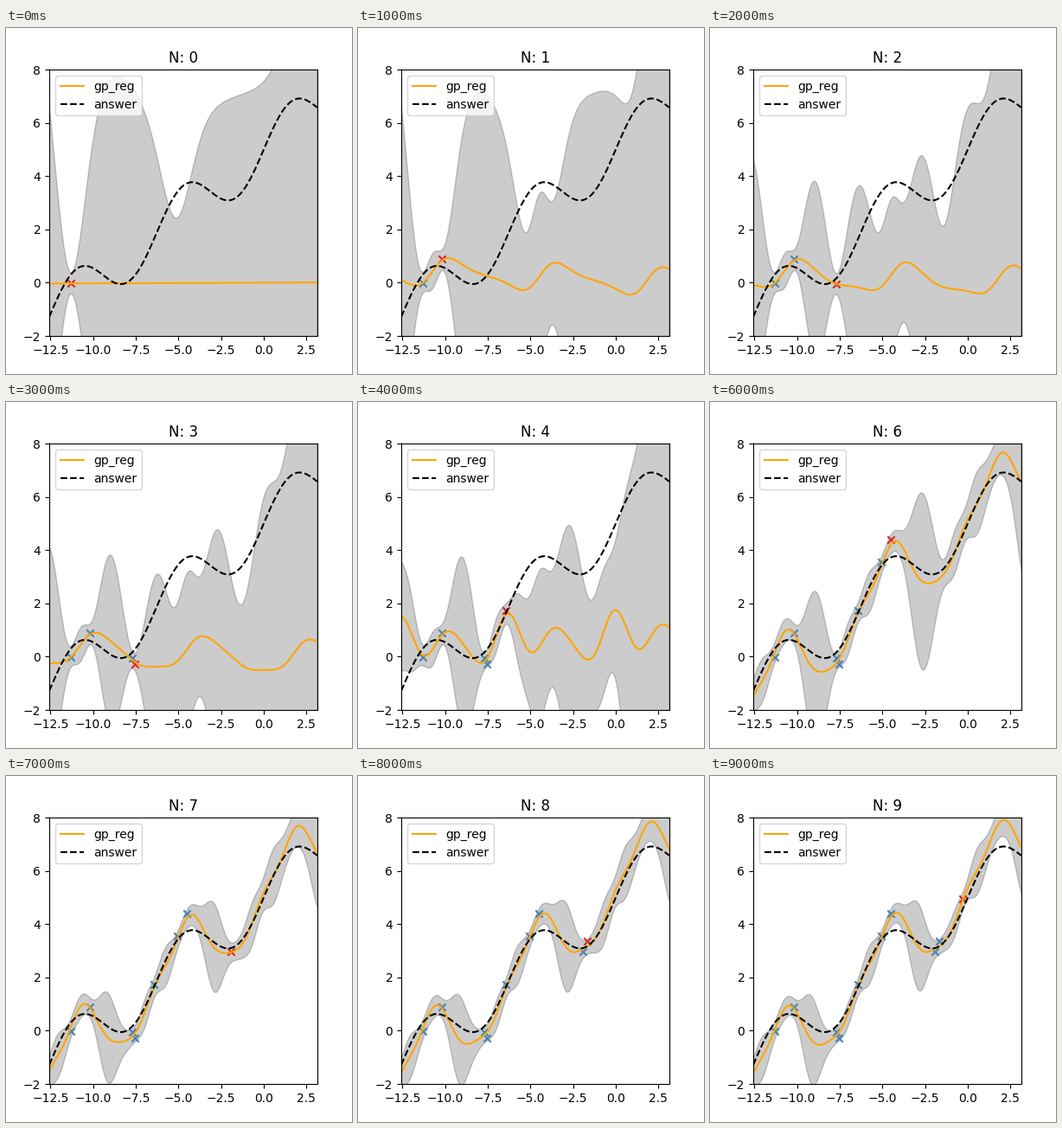
These frames come from a looping animation (400 by 400 pixels, 10 s). A matplotlib script:

```python
import numpy as np
import matplotlib.pyplot as plt
from matplotlib.animation import FuncAnimation

NOISE = 0.1

# observed (x, y), one more per step
POINTS = [(-11.28, -0.03), (-10.17, 0.88), (-7.70, -0.06), (-7.55, -0.28),
          (-6.43, 1.72), (-5.07, 3.54), (-4.51, 4.38), (-1.93, 2.96),
          (-1.67, 3.37), (-0.28, 4.96)]

grid = np.linspace(-4 * np.pi, np.pi, 300)
answer = np.sin(grid) + 0.5 * grid + 5


def kernel(a, b):
    """Linear trend with bias plus a periodic term."""
    a, b = a[:, None], b[None, :]
    return 1 + a * b + np.exp(np.cos(a - b))


def regress(x, y):
    """Posterior mean and variance on the grid."""
    cov = kernel(x, x) + NOISE * np.eye(len(x))
    cross = kernel(grid, x)
    weights = np.linalg.solve(cov, cross.T).T
    prior = 1 + grid ** 2 + np.e + NOISE
    return weights @ y, prior - np.sum(cross * weights, axis=1)


fig, ax = plt.subplots(figsize=(4, 4), dpi=100)
fig.subplots_adjust(left=0.125, right=0.9, bottom=0.11, top=0.88)


def draw(n):
    x, y = np.array(POINTS[:n + 1]).T
    mean, var = regress(x, y)
    ax.clear()
    ax.fill_between(grid, mean - 2 * var, mean + 2 * var,
                    color="black", alpha=0.2)
    ax.scatter(x[:-1], y[:-1], marker="x", color="steelblue")
    ax.scatter(x[-1:], y[-1:], marker="x", color="tab:red")
    ax.plot(grid, mean, color="orange", label="gp_reg")
    ax.plot(grid, answer, color="black", ls="--", label="answer")
    ax.set_xlim(grid[0], grid[-1])
    ax.set_ylim(-2, 8)
    ax.set_title(f"N: {n}")
    ax.legend(loc="upper left")
    return ax.get_children()


anim = FuncAnimation(fig, draw, frames=len(POINTS), init_func=lambda: draw(0),
                     interval=1000, repeat=True, repeat_delay=0)
plt.show()
```
